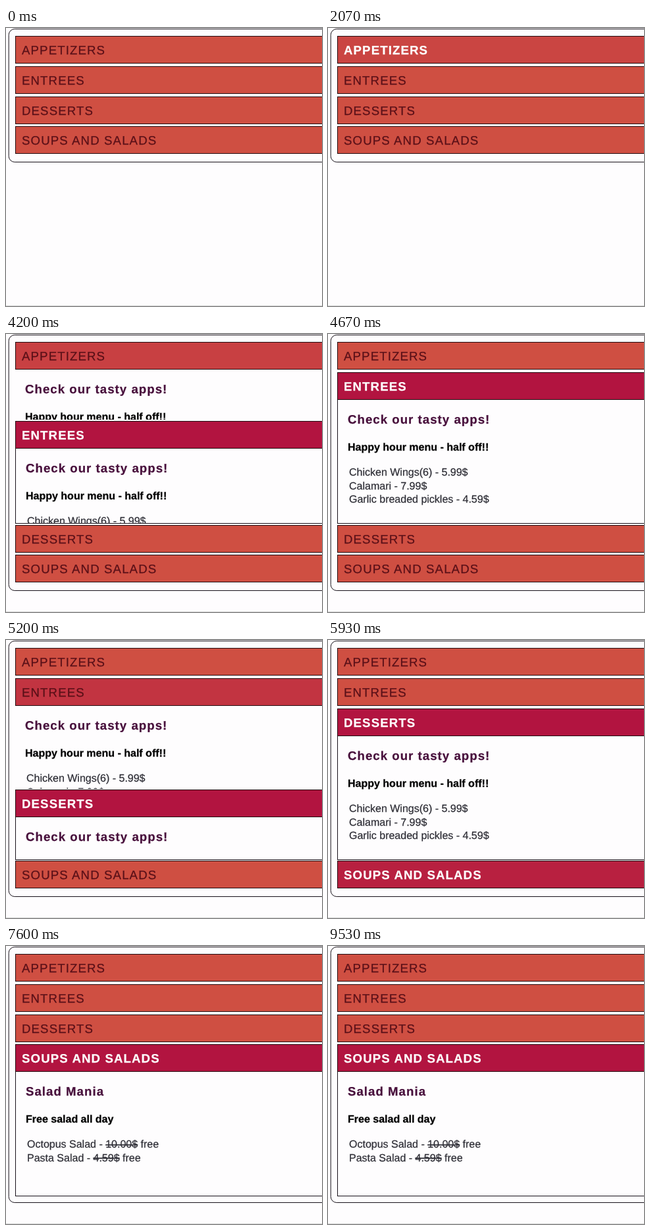
Recreate the animation shown at these times as an HTML page. Size 480 by 422 pixels, loop 9.59 s.

```html
<!DOCTYPE html>
<html lang="en">
<head>
<meta charset="utf-8">
<title>Menu accordion</title>
<style>
  html, body { margin: 0; width: 100%; height: 100%; overflow: hidden; background: #fefdfe; }
  svg { display: block; }
  text {
    font: 16px "Liberation Sans", Arial, sans-serif;
    text-rendering: geometricPrecision;
    color: #2e2e36; fill: currentColor; stroke: currentColor; stroke-width: 0.25px;
  }
  .title { font-size: 18.6px; letter-spacing: 1.14px; color: #5a1018; }
  .hot .title { color: #fff; font-weight: bold; }
  .heading { font-size: 18.6px; letter-spacing: 1.05px; color: #48103c; font-weight: bold; }
  .lead { color: #000; font-weight: bold; }
  .strike { text-decoration: line-through; }
  .box { fill: none; stroke: #18121a; }
</style>
</head>
<body>
<svg id="stage" width="480" height="422">
  <rect id="frame" class="box" x="4.2" y="1.5" width="500" rx="9"/>
  <path d="M0 421.5H480" stroke="#ddd"/>
</svg>
<script>
const LOOP = 9590, SLIDE = 400, FADE = 500, PANEL = 186;
const TOP = 12, STEP = 45.8, HEADER = 42, GAP = 1.5;
const idle = [207, 79, 66], active = [178, 20, 64];

const apps = ['Check our tasty apps!', 'Happy hour menu - half off!!',
  'Chicken Wings(6) - 5.99$', 'Calamari - 7.99$', 'Garlic breaded pickles - 4.59$'];
const salads = ['Salad Mania', 'Free salad all day',
  'Octopus Salad - <tspan class="strike">10.00$</tspan> free',
  'Pasta Salad - <tspan class="strike">4.59$</tspan> free'];

// hover and click times of each section
const sections = [
  { title: 'APPETIZERS', lines: apps, hover: 2000, click: 2548 },
  { title: 'ENTREES', lines: apps, hover: 3650, click: 3975 },
  { title: 'DESSERTS', lines: apps, hover: 4750, click: 5044 },
  { title: 'SOUPS AND SALADS', lines: salads, hover: 5680, click: 6080 }
];

const stage = document.getElementById('stage');
const frame = document.getElementById('frame');
const clamp = x => Math.max(0, Math.min(1, x));
const swing = x => 0.5 - Math.cos(Math.PI * clamp(x)) / 2;
const bezier = (a, b, u) => 3 * a * u * (1 - u) ** 2 + 3 * b * u * u * (1 - u) + u ** 3;

// CSS "ease"
function ease(x) {
  x = clamp(x);
  if (x === 0 || x === 1) return x;
  let low = 0, high = 1;
  for (let i = 0; i < 20; i++) {
    const mid = (low + high) / 2;
    if (bezier(0.25, 0.25, mid) < x) low = mid; else high = mid;
  }
  return bezier(0.1, 1, low);
}

function add(tag, parent, attrs, html = '') {
  const node = document.createElementNS('http://www.w3.org/2000/svg', tag);
  for (const name in attrs) node.setAttribute(name, attrs[name]);
  node.innerHTML = html;
  return parent.appendChild(node);
}

sections.forEach((s, i) => {
  s.close = sections[i + 1] ? sections[i + 1].click : Infinity;
  s.panel = add('svg', stage, { width: 480 });
  s.border = add('rect', s.panel, { class: 'box', x: 14.5, y: -5.5, width: 500 });
  s.content = add('g', s.panel, {});
  s.lines.forEach((line, n) => add('text', s.content, {
    class: ['heading', 'lead'][n] || '',
    x: n < 2 ? 30 : 32,
    y: n < 2 ? 36 + 40.5 * n : 115.3 + 20.2 * (n - 2)
  }, line));
  s.header = add('g', stage, {});
  s.bar = add('rect', s.header, { class: 'bar', x: 14.5, y: 0.5, width: 500, height: HEADER - 1, stroke: '#220c10' });
  add('text', s.header, { class: 'title', x: 24, y: 27.5 }, s.title);
});

function draw(t) {
  let shift = 0;
  sections.forEach((s, i) => {
    const open = swing((t - s.click) / SLIDE) - swing((t - s.close) / SLIDE);
    const heat = ease((t - s.hover) / FADE) - ease((t - s.close) / FADE);
    const closing = t >= s.close;
    const top = Math.round(TOP + STEP * i + shift);
    shift += PANEL * open;
    const bottom = Math.round(TOP + STEP * (i + 1) + shift - GAP);
    const height = Math.max(0, bottom - top - HEADER);

    s.header.setAttribute('transform', `translate(0 ${top})`);
    s.header.setAttribute('class', t >= s.hover && !closing ? 'hot' : '');
    s.bar.setAttribute('fill', `rgb(${idle.map((c, k) => Math.round(c + (active[k] - c) * heat))})`);

    s.panel.style.display = open > 0 ? '' : 'none';
    s.panel.setAttribute('y', top + HEADER);
    s.panel.setAttribute('height', height);
    s.border.setAttribute('height', height + 5);
    s.border.style.display = closing ? 'none' : '';
    s.content.setAttribute('transform', `translate(${closing ? -1 : 0} 0)`);
  });
  frame.setAttribute('height', Math.round(202 + shift));
}

const start = performance.now();
function tick() {
  draw((performance.now() - start) % LOOP);
  requestAnimationFrame(tick);
}
tick();
</script>
</body>
</html>
```
